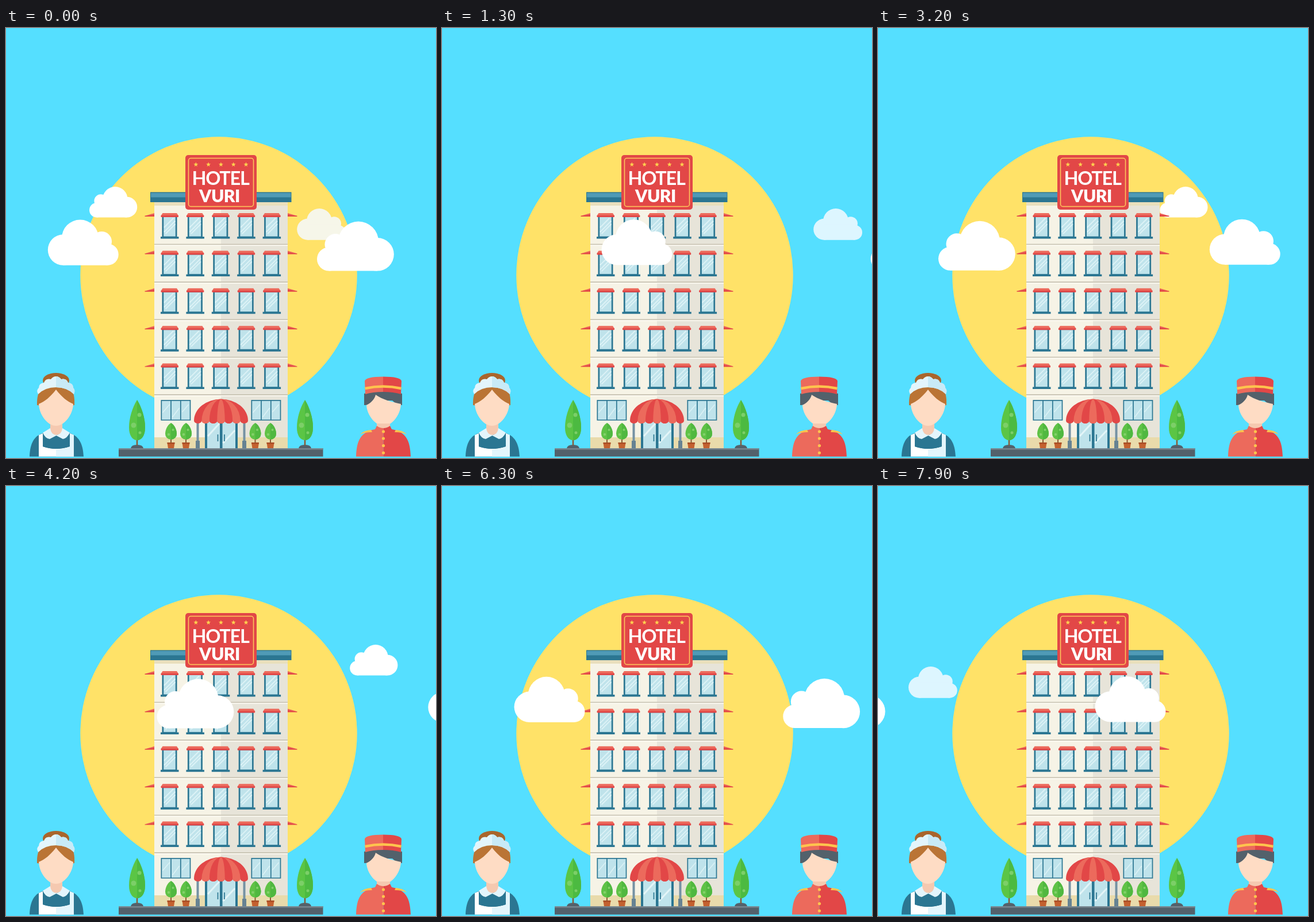
Recreate the animation shown at these times as an HTML page. Size 748 by 748 pixels, loop 8000 ms.

```html
<!DOCTYPE html>
<html lang="en">
<head>
<meta charset="utf-8">
<title>Hotel with drifting clouds</title>
<style>
  html, body { margin: 0; width: 100%; height: 100%; overflow: hidden; background: #55dfff; }
  svg { display: block; width: 100vw; height: 100vh; }
  text { font-family: Lato, "Open Sans", sans-serif; fill: #fff; text-anchor: middle; }
</style>
</head>
<body>
<svg viewBox="0 0 748 748">
  <defs>
    <g id="cloudA">
      <circle cx="56.500" cy="32" r="32"/><circle cx="94" cy="38" r="17.500"/>
      <circle cx="27" cy="52.500" r="26.700"/><circle cx="104.500" cy="60.500" r="18.700"/>
      <path d="M27 40H104V79.200H27z"/>
    </g>
    <g id="cloudB">
      <circle cx="72" cy="35" r="35"/><circle cx="32" cy="40" r="18.500"/>
      <circle cx="20.500" cy="65.500" r="20.500"/><circle cx="105" cy="57.300" r="28.800"/>
      <path d="M20.500 45H105V86H20.500z"/>
    </g>
    <g id="window">
      <path fill="#2b7692" d="M2 6H28V41H31V44.500H-.5V41H2z"/>
      <path fill="#bfe3eb" d="M4.700 7H25.300V40.500H4.700z"/>
      <path stroke="#dcf2f6" stroke-width="2" d="M5.500 25L22 8.500M8 36L25 19M5.500 33L25 13.500"/>
      <path fill="#ec6a5c" d="M3 0H27.500L30.500 4.500H0z"/>
      <path fill="#e24747" d="M0 4H30.500V6Q30.500 7 29.500 7H1Q0 7 0 6z"/>
    </g>
    <g id="sideAwning">
      <path fill="#ec6a5c" d="M258 0V5L241 5z"/>
      <path fill="#e24747" d="M258 2.500V6H242Q240.500 5.500 242 4.800z"/>
    </g>
    <g id="wideWindow">
      <path fill="#bfe3eb" stroke="#2b7692" stroke-width="1.700" d="M.8.800H51V35H.8z"/>
      <path stroke="#dcf2f6" stroke-width="1.500" d="M3 22L15 8M20 30L32 14M37 21L48 8"/>
      <path stroke="#2b7692" stroke-width="1.700" d="M17.500 1V35M34.300 1V35"/>
    </g>
    <g id="bush">
      <path fill="#c4612f" d="M-6.500 721H6.500L5 731.500H-5z"/>
      <path fill="#a94d25" d="M-6.500 721H6.500V723.500H-6.500z"/>
      <path stroke="#8a5a34" stroke-width="2" d="M0 705V721"/>
      <path fill="#5fc246" d="M0 687C7 691 10 700 10 706A10 10 0 0 1-10 706C-10 700-7 691 0 687z"/>
      <path fill="#50b840" d="M0 687C7 691 10 700 10 706A10 10 0 0 1 0 716z"/>
      <circle cx="3.500" cy="699" r="2" fill="#82d06a"/><circle cx="-4" cy="707" r="2.300" fill="#82d06a"/>
    </g>
    <g id="tree">
      <path fill="#53616b" d="M-11 731Q-10 725 0 725T11 731z"/>
      <path stroke="#8a5a34" stroke-width="2.500" d="M0 700V726"/>
      <path fill="#5bc545" d="M0 647C8 660 14 678 14 695C14 709 8 717 0 717S-14 709-14 695C-14 678-8 660 0 647z"/>
      <path fill="#4cba41" d="M0 647C8 660 14 678 14 695C14 709 8 717 0 717z"/>
      <g fill="#7ccf68"><circle cx="4" cy="673" r="3.500"/><circle cx="-6" cy="691" r="4.500"/><circle cx="5" cy="704" r="2.500"/></g>
    </g>
  </defs>

  <rect width="748" height="748" fill="#55dfff"/>
  <circle cx="370" cy="430" r="240.700" fill="#ffe268"/>
  <g id="far"></g>

  <g id="hotel">
    <path fill="#f6f3e6" d="M258 303H374V731H258z"/>
    <path fill="#e7e4d9" d="M374 303H490V731H374z"/>
    <path fill="#e9dfbc" d="M258 303H490V309H258z"/>
    <path fill="#e9dbab" d="M258 712H490V731H258z"/>
    <path fill="#2b7692" d="M251 285.500H496.500V303H251z"/>
    <path fill="#4f9ab6" d="M252 287H495.500V294.500H252z"/>
    <g id="floors"></g>
    <use href="#wideWindow" x="269.500" y="647"/>
    <use href="#wideWindow" x="426.500" y="647"/>

    <path fill="#2b7692" d="M346 682H403V731H346z"/>
    <path fill="#bfe3eb" d="M350 682H372V731H350zM376.500 682H399V731H376.500z"/>
    <path stroke="#e3f5f8" stroke-width="3" d="M351 710L371 688M377.500 722L398 700"/>
    <path stroke="#2b7692" stroke-width="1.700" d="M368.500 707V719M380 707V719"/>
    <path stroke="#7592a3" stroke-width="4" d="M333.500 686V731M414.500 686V731"/>
    <path stroke="#668292" stroke-width="7" d="M333.500 718V731M414.500 718V731"/>
    <g id="canopy"></g>

    <rect x="312" y="221" width="124" height="95" rx="5" fill="#e24747"/>
    <rect x="317.500" y="226.500" width="113" height="84" rx="4" fill="none" stroke="#ffcb5c" stroke-width="1.500"/>
    <g id="stars" fill="#ffd14f"></g>
    <text x="373" y="272.500" font-size="32.500" font-weight="700" letter-spacing="-1.300">HOTEL</text>
    <text x="371.500" y="303" font-size="30" font-weight="900" letter-spacing="-.5">VURI</text>
  </g>

  <g id="plants"></g>
  <path fill="#53616b" d="M196 731H551.500V745.500H196z"/>
  <path fill="#78868f" d="M196 731H551.500V733.500H196z"/>

  <g id="maid">
    <ellipse cx="87" cy="613" rx="23" ry="13" fill="#a9652b"/>
    <path fill="#ba7435" d="M54 656C53 630 64 616 87 616S121 630 119 656Q112 658 100 650H74Q62 658 54 656z"/>
    <path fill="#f5c9b0" d="M77 680H98V715H77z"/>
    <path fill="#fedcc4" d="M87 629C97 642 107 650 117 654C116 674 101 692 87 692S58 674 57 654C67 650 77 642 87 629z"/>
    <path fill="#e3f5fc" d="M56 637Q52 630 57 626Q57 618 66 617Q69 609 78 611Q82 606 87 606T96 611Q105 609 108 617Q117 618 117 626Q121 630 118 637Q106 625 87 625T56 637z"/>
    <path fill="#c8eaf7" d="M87 606Q92 606 96 611Q105 609 108 617Q117 618 117 626Q121 630 118 637Q106 625 87 625z"/>
    <path fill="#2b7692" d="M41 745.500C42 722 49 709 66 704L87 713L109 704C126 709 134 722 135 745.500z"/>
    <path fill="#fff" d="M57 745.500V708L64 705V728Q87 736 111 728V705L118 708V745.500z"/>
    <path fill="#e3f5fc" d="M87 733Q101 733 111 728V705L118 708V745.500H87z"/>
    <path fill="#2b7692" d="M64 707H111V728Q87 736 64 728z"/>
    <path fill="#f5c9b0" d="M77 694H98Q98 707 87.500 708T77 694z"/>
    <path fill="#e3f5fc" d="M77 696Q78 707 87.500 708Q97 707 98 696L111 704Q106 714 99 715L87.500 709L76 715Q68 714 64 704z"/>
  </g>

  <g id="porter">
    <path fill="#53616b" d="M623 656V636Q656 624 689 636V656Q680 656 672 648H642Q632 657 623 656z"/>
    <path fill="#f5c9b0" d="M645 680H668V705H645z"/>
    <path fill="#fedcc4" d="M643 638C654 646 672 651 687 654C686 674 671 692 657 692S628 674 627 656C635 652 641 646 643 638z"/>
    <path fill="#ec6a5c" d="M624 614Q626 606.500 656 606.500V633Q638 633 625 637z"/>
    <path fill="#e24747" d="M688 614Q686 606.500 656 606.500V633Q674 633 687 637z"/>
    <path fill="none" stroke="#ffc34d" stroke-width="4.500" d="M624.500 627Q656 620 687.500 627"/>
    <path fill="#ec6a5c" d="M609 745.500C610 717 617 703 642 698L645 692Q650 696 656.500 696V745.500z"/>
    <path fill="#e24747" d="M704 745.500C703 717 696 703 671 698L668 692Q663 696 656.500 696V745.500z"/>
    <path fill="#f5c9b0" d="M645 688H668Q666 695 656.500 695T645 688z"/>
    <path fill="#ffc34d" d="M616 707Q622 700 635 699L637 703Q624 703 616 707zM697 707Q691 700 678 699L676 703Q689 703 697 707z"/>
    <g fill="#ffc34d"><circle cx="656.500" cy="702" r="2.600"/><circle cx="656.500" cy="714" r="2.600"/><circle cx="656.500" cy="726.500" r="2.600"/><circle cx="656.500" cy="739" r="2.600"/></g>
  </g>

  <g id="near" fill="#fff"></g>
</svg>
<script>
const LOOP = 8000, STEP = 100;
const el = id => document.getElementById(id);
const fill = (id, markup) => { el(id).innerHTML = markup; };
const range = n => [...Array(n).keys()];

fill('floors', range(5).map(row => {
  const y = 322 + row * 65.4;
  const windows = range(5).map(col =>
    `<use href="#window" x="${269.5 + col * 44.4}" y="${y}"/>`).join('');
  return `<path fill="#cbc6b6" d="M258 ${y + 53.5}h232v2h-232z"/>
    <path fill="#fffdf5" d="M258 ${y + 55.5}h232v1.500h-232z"/>
    <use href="#sideAwning" y="${y}"/>
    <use href="#sideAwning" transform="translate(748 ${y}) scale(-1 1)"/>${windows}`;
}).join(''));

// Nested half ellipses give the canopy its seven scalloped stripes.
const half = 47 / 7;
fill('canopy', [7, 5, 3, 1].map((n, i) => {
  const w = n * half;
  const scallops = `a${half} 5 0 0 1 ${-2 * half} 0`.repeat(n);
  return `<path fill="${i % 2 ? '#ec6a5c' : '#e24747'}"
    d="M${374 - w} 683a${w} 37.500 0 0 1 ${2 * w} 0${scallops}z"/>`;
}).join(''));

const star = (cx, cy) => '<polygon points="' + range(10).map(i => {
  const r = i % 2 ? 1.8 : 4.2, a = i * Math.PI / 5;
  return [cx + r * Math.sin(a), cy - r * Math.cos(a)];
}).join(' ') + '"/>';
fill('stars', range(5).map(i => star(330.3 + i * 21.8, 237.5)).join(''));

fill('plants', [228, 520].map(x => `<use href="#tree" x="${x}"/>`).join('') +
  [287, 313, 433.5, 460].map(x => `<use href="#bush" x="${x}"/>`).join(''));

// Each start is the x position at time zero for one crossing of the stage.
const clouds = [
  { layer: 'far', shape: 'cloudB', scale: .622, y: 276, speed: .1079, rise: 0, starts: [145], look: 'fill="#fff"' },
  { layer: 'far', shape: 'cloudA', scale: .69, y: 314, speed: .1077, rise: 0, starts: [506, -798], look: 'fill="#f5faff" opacity=".855"' },
  { layer: 'near', shape: 'cloudA', scale: 1, y: 333.5, speed: .1575, rise: .00027, starts: [72.5, -867], look: '' },
  { layer: 'near', shape: 'cloudB', scale: 1, y: 336.5, speed: .1575, rise: .00022, starts: [541, -399, -1365.5], look: '' }
];
const flights = clouds.flatMap(c => c.starts.map(start => {
  el(c.layer).insertAdjacentHTML('beforeend', `<g ${c.look}><use href="#${c.shape}"/></g>`);
  return { ...c, start, node: el(c.layer).lastElementChild };
}));

function draw(now) {
  const t = Math.floor(now % LOOP / STEP) * STEP;
  for (const f of flights) {
    f.node.setAttribute('transform',
      `translate(${f.start + f.speed * t} ${f.y - f.rise * t}) scale(${f.scale})`);
  }
  requestAnimationFrame(draw);
}
draw(performance.now());
</script>
</body>
</html>
```
